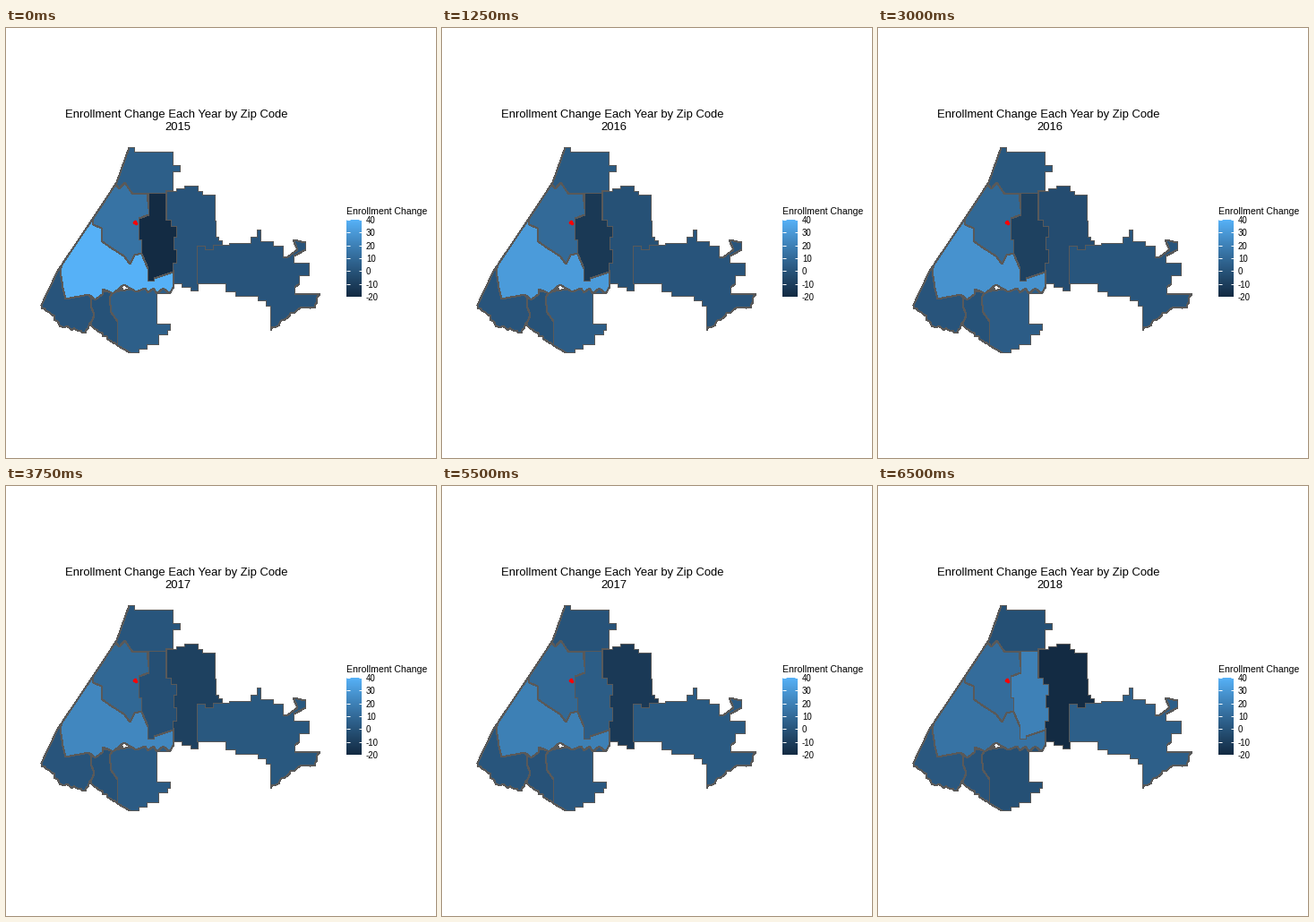
Write a matplotlib script that moves like this. It is 480x480 px and loops after 8 s.

```python
import numpy as np
import matplotlib.pyplot as plt
from matplotlib.animation import FuncAnimation
from matplotlib.collections import PolyCollection

SIZE, DPI = 480, 100
PX = 72 / DPI                      # points per pixel
STEP, FRAMES = 250, 32             # ms per frame, frames per loop
START, PERIOD, TWEEN = 1, 10, 5    # last hold frame, frames per year, tween steps
LOW, HIGH = -20, 40

plt.rcParams["font.family"] = "Liberation Sans"
rng = np.random.default_rng(4)

DARK = np.array([0x13, 0x2B, 0x43])
LIGHT = np.array([0x56, 0xB1, 0xF7])
DIP = np.array([2, 4, 5])          # perceptual blend is a little darker midway


def shade(values):
    t = (np.asarray(values, float)[..., None] - LOW) / (HIGH - LOW)
    return (DARK + t * (LIGHT - DARK) - 4 * t * (1 - t) * DIP) / 255


# --- outline helpers ---
SHORE = np.array([(137, 133), (123, 172), (104, 201), (57, 271), (38, 311)])


def coast(top, bottom):
    """Shoreline from one height down to another."""
    ys = np.arange(top, bottom + 1, 3)
    return list(zip(np.interp(ys, SHORE[:, 1], SHORE[:, 0]), ys))


def stairs(x, y, *turns):
    """Path of alternating horizontal and vertical runs."""
    path = [(x, y)]
    for i, v in enumerate(turns):
        x, y = (x, v) if i % 2 else (v, y)
        path.append((x, y))
    return path


def rough(*points, amp=1.6):
    """Ragged line through the points."""
    path = []
    for a, b in zip(np.array(points), np.array(points[1:])):
        n = max(int(np.hypot(*(b - a)) / 3), 1)
        line = a + (b - a) * np.arange(n)[:, None] / n
        path += list(line + rng.uniform(-amp, amp, line.shape))
    return path + [points[-1]]


# --- regions; later ones cover the hidden parts of earlier ones ---
southwest = coast(264, 311) + rough(
    (38, 312), (52, 321), (58, 331), (88, 339), (98, 323)) + [(98, 285)]

south_centre = [(92, 297), (95, 302), (94, 309), (98, 320)] + rough(
    (92, 332), (108, 342), (124, 354)) + [(130, 290)]

south = [(119, 294), (115, 301), (117, 317), (124, 327), (124, 354)] + stairs(
    138, 362, 148, 358, 157, 353, 170, 342, 180, 337, 183, 330, 168, 296,
    180, 293, 184, 285)

east = stairs(178, 181, 189, 178, 198, 175, 213, 181, 218, 185, 232, 214,
              233, 232, 236, 236, 240, 243, 230, 247, 213, 292, 205, 288,
              195, 284, 178)

far_east = stairs(213, 243, 222, 247, 231, 242, 249, 240, 273, 233, 280, 225,
                  284, 238, 298, 243, 309, 255)
far_east += [(313, 256), (325, 247), (320, 236), (334, 239), (334, 247), (321, 254)]
far_east += stairs(321, 262, 338, 276, 327, 285)
far_east += [(322, 289), (322, 297)] + rough(
    (349, 296), (345, 311), (326, 313), (306, 328), (295, 337))
far_east += stairs(295, 310, 290, 304, 281, 299, 256, 294, 245, 285, 213)

west = coast(200, 265) + [
    (60, 270), (63, 290), (66, 302), (92, 297), (99, 303), (107, 297),
    (108, 291), (119, 296), (131, 286), (145, 294), (155, 290), (158, 295),
    (164, 290), (168, 296), (175, 290), (182, 296), (187, 288), (186, 270),
    (140, 230)]

north = coast(133, 180) + stairs(150, 195, 178, 181, 186, 160, 194, 153,
                                 186, 138, 143, 133)

midwest = [
    (123, 175), (126, 179), (132, 172), (141, 185), (157, 184), (160, 210),
    (155, 250), (143, 253), (138, 263), (131, 254), (117, 245), (107, 238),
    (106, 223), (97, 219)] + coast(176, 212)[::-1]

centre = stairs(159, 184, 178, 214, 184, 221, 190, 233, 187, 247, 190, 262,
                186, 272) + [
    (165, 279), (165, 282), (158, 282), (158, 268), (151, 252), (151, 236),
    (148, 236), (148, 212), (159, 208)]

# Outline and enrollment change for 2015 to 2018
REGIONS = [(southwest, (0, 0, 0, 2)),
           (south_centre, (-1, -1, -1, 0)),
           (south, (5, 4, 3, -2)),
           (east, (0, -2, -11, -20)),
           (far_east, (0, 0, 2, 5)),
           (west, (40, 29, 21, 14)),
           (north, (5, 2, 0, -2)),
           (midwest, (14, 9, 9, 11)),
           (centre, (-20, -11.5, 0, 20))]
VALUES = np.array([v for _, v in REGIONS], float)

# --- stage ---
fig = plt.figure(figsize=(SIZE / DPI, SIZE / DPI), dpi=DPI, facecolor="white")
ax = fig.add_axes([0, 0, 1, 1])


def label(x, y, text, size, **kw):
    return ax.text(x, y, text, fontsize=size * PX, color="black", **kw)


areas = PolyCollection([np.array(p) + 0.5 for p, _ in REGIONS],
                       facecolors=shade(VALUES[:, 0]), edgecolors="#595959",
                       linewidths=PX, antialiaseds=False)
ax.add_collection(areas)
ax.scatter([142.8, 144.4, 145.4], [217.3, 215.8, 217.8], s=(3.6 * PX) ** 2,
           color="red", linewidths=0, zorder=3)

label(190, 100, "Enrollment Change Each Year by Zip Code", 13, ha="center")
year = label(177.5, 114, "2015", 13)

# legend
LEFT, RIGHT, BOTTOM, TOP = 380, 397, 300, 214
label(LEFT - 0.5, 208, "Enrollment Change", 10.5)
ax.imshow(shade(np.linspace(HIGH, LOW, BOTTOM - TOP))[:, None],
          extent=(LEFT, RIGHT, BOTTOM, TOP), aspect="auto",
          interpolation="nearest")
for value in range(LOW, HIGH + 1, 10):
    y = BOTTOM - (value - LOW) * (BOTTOM - TOP) / (HIGH - LOW)
    for x in (LEFT, RIGHT - 3.5):
        ax.plot([x, x + 3.5], [y, y], color="white", lw=PX, solid_capstyle="butt")
    label(402, y + 4, str(value), 9.6)

ax.set_xlim(0, SIZE)
ax.set_ylim(SIZE, 0)
ax.axis("off")


def draw(i):
    index, step = divmod(max(i - START, 0), PERIOD)
    t = min(step / TWEEN, 1)
    last = VALUES.shape[1] - 1
    a, b = min(index, last), min(index + 1, last)
    areas.set_facecolor(shade(VALUES[:, a] * (1 - t) + VALUES[:, b] * t))
    year.set_text(str(2015 + (b if t > 0.7 else a)))
    return areas, year


anim = FuncAnimation(fig, draw, frames=FRAMES, interval=STEP,
                     repeat=True, repeat_delay=0, blit=False)
plt.show()
```
